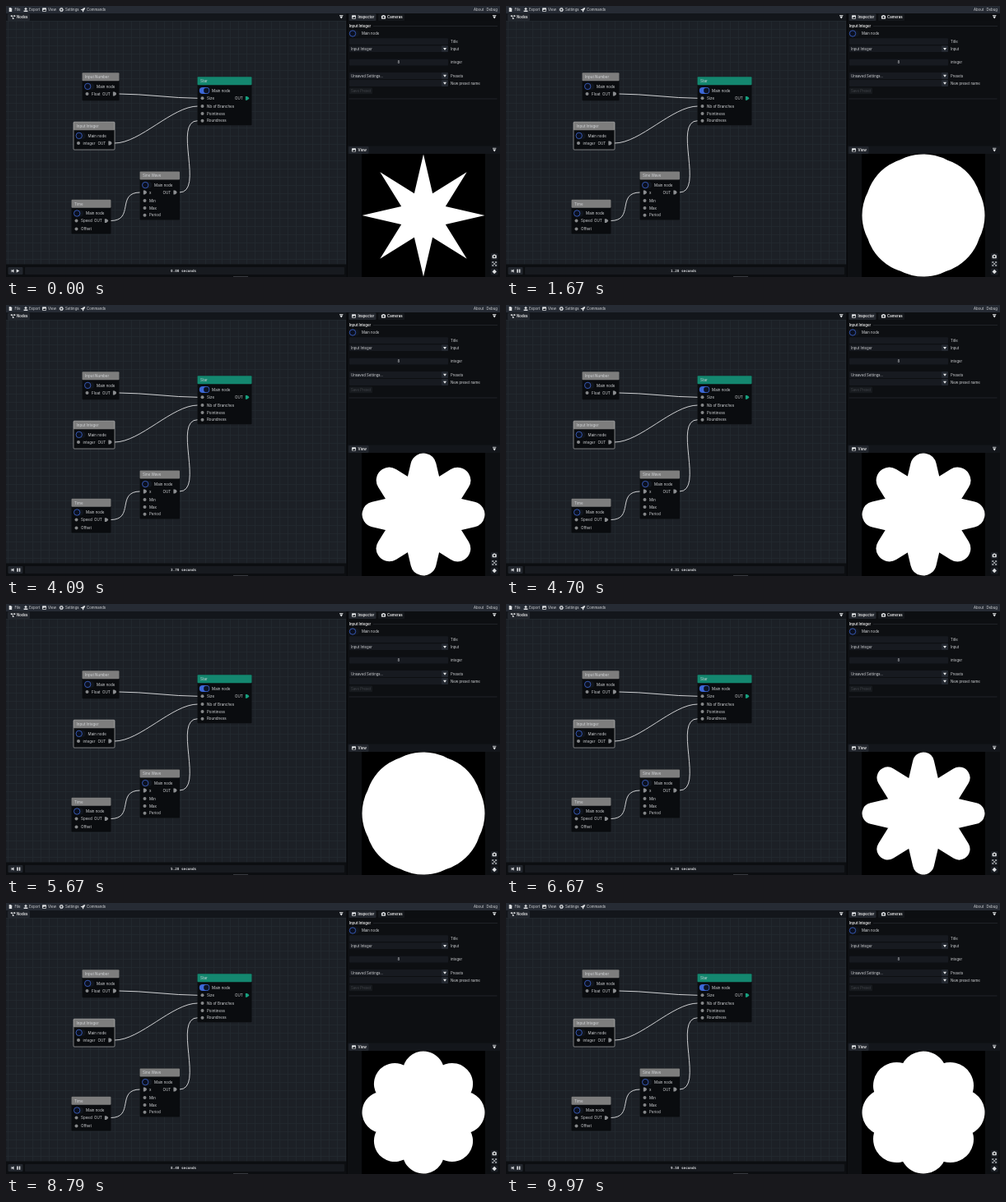
Write an HTML page that moves like this. It is 600x330 px and loops after 10000 ms.

```html
<!DOCTYPE html>
<html lang="en">
<head>
<meta charset="utf-8">
<title>Node editor</title>
<style>
  html, body { margin: 0; width: 100%; height: 100%; overflow: hidden; background: #0d0f12; }
  svg { display: block; width: 600px; height: 330px; }
  text { font: 4.3px Inter, sans-serif; fill: #d4d6d9; white-space: pre; }
  .node { font-size: 4.5px; }
  .bold { font-weight: 600; fill: #ececec; }
  .dim { fill: #43464b; }
  .mono { font: bold 4.3px "DejaVu Sans Mono", monospace; text-anchor: middle; }
</style>
</head>
<body>
<svg id="stage" viewBox="0 0 600 330" xmlns="http://www.w3.org/2000/svg">
  <defs>
    <pattern id="grid" width="10" height="10" x="2" y="18" patternUnits="userSpaceOnUse">
      <path d="M0 .5H10M.5 0V10" stroke="#242a31" stroke-width=".7"/>
    </pattern>
    <clipPath id="view"><rect x="432" y="180" width="150" height="150"/></clipPath>
  </defs>
</svg>
<script>
const LOOP = 10000, PLAY_AT = 395;
const CX = 507, CY = 255, RADIUS = 74.5, BRANCHES = 8, INNER = 0.39;
const LINK_STRENGTH = 31;
const stage = document.getElementById('stage');

function add(tag, attrs, content) {
  const el = document.createElementNS('http://www.w3.org/2000/svg', tag);
  for (const key in attrs) el.setAttribute(key, attrs[key]);
  if (content !== undefined) el.textContent = content;
  stage.appendChild(el);
  return el;
}
const rect = (x, y, width, height, fill, rx = 0) => add('rect', { x, y, width, height, fill, rx });
const label = (x, y, str, cls = '') => add('text', { x, y: y + 1.6, class: cls }, str);
const dot = (cx, cy, r, fill) => add('circle', { cx, cy, r, fill });
const path = (d, fill, stroke = 'none', width = 0.7) =>
  add('path', { d, fill, stroke, 'stroke-width': width });
const arrow = (x, y, fill = '#e4e6e8') => path(`M${x - 2} ${y - 1.3}h4l-2 3z`, fill);

function toggle(x, y, on) {
  if (on) {
    rect(x - 6, y - 4, 12.5, 8, '#3d68d8', 4);
    dot(x + 2.5, y, 3.2, '#0d1426');
    return;
  }
  rect(x - 4, y - 4, 12, 8, '#11151c', 4);
  add('circle', { cx: x, cy: y, r: 3.7, fill: '#0b1020', stroke: '#3a5fc0', 'stroke-width': 0.9 });
}

const outPin = (x, y, fill = '#8b8d90') =>
  path(`M${x - 2} ${y - 2.4}h1.8q2.4 1 2.4 2.4t-2.4 2.4h-1.8z`, fill);

function node({ x, y, w, h, title, rows, out, color = '#7d7d7d', pin, selected, on, bodyPin }) {
  rect(x, y, w, h, '#0a0c0f', 1);
  rect(x, y, w, 10, color, 1);
  if (selected) add('rect', { x, y, width: w, height: h, rx: 1, fill: 'none', stroke: '#c4c4c4', 'stroke-width': 0.6 });
  label(x + 3.6, y + 5.4, title, 'node');
  toggle(x + (on ? 8.3 : 6.7), y + 16.7, on);
  label(x + 17.6, y + 16.9, 'Main node', 'node');
  rows.forEach(([name, rowY], i) => {
    if (bodyPin && i === 0) outPin(x + 6.3, rowY);
    else dot(x + 6, rowY, 2, '#858789');
    label(x + 11.5, rowY, name, 'node');
  });
  label(out, rows[0][1], 'OUT', 'node');
  outPin(x + w - 5.6, rows[0][1], pin);
}

// Tangents keep a fixed strength and ease off on short links.
function link(x1, y1, x2, y2) {
  const half = Math.hypot(x2 - x1, y2 - y1) / 2;
  const c = LINK_STRENGTH * Math.sin(Math.PI / 2 * Math.min(1, half / LINK_STRENGTH));
  path(`M${x1} ${y1}C${x1 + c} ${y1} ${x2 - c} ${y2} ${x2} ${y2}`, 'none', '#d8dadc', 0.95);
}

function imageIcon(x, y) {
  rect(x - 2.5, y - 2.2, 5, 4.4, '#dcdee0', 0.7);
  path(`M${x - 1.9} ${y + 1.5}l1.3-1.8.8.8.8-1.2 1 2.2z`, '#15181d');
}
function cameraIcon(x, y) {
  rect(x - 2.6, y - 1.7, 5.2, 3.9, '#dcdee0', 0.7);
  rect(x - 1.2, y - 2.4, 2.4, 1.2, '#dcdee0', 0.3);
  dot(x, y + 0.2, 1.1, '#15181d');
}

// Menu bar
rect(0, 0, 600, 9, '#262b34');
path('M3.7 2h2.3l1.2 1.2v3.7h-3.5z', '#dcdee0');
path('M21.6 5.6h4.8v1.4h-4.8zM24 1.8l2 2.1h-1.3v1.4h-1.4V3.9H22z', '#dcdee0');
imageIcon(46.5, 4.5);
add('circle', { cx: 67.3, cy: 4.5, r: 1.6, fill: 'none', stroke: '#dcdee0', 'stroke-width': 1.2 });
add('circle', { cx: 67.3, cy: 4.5, r: 2.3, fill: 'none', stroke: '#dcdee0', 'stroke-width': 0.8, 'stroke-dasharray': '.9 .9' });
path('M96.2 2q-2.6 0-3.5 1.7l-1.5.3-.5 1 1.3.1 1 1 .1 1.3 1-.5.3-1.5q1.8-.9 1.8-3.4z', '#dcdee0');
[[10.5, 'File'], [28, 'Export'], [51, 'View'], [72, 'Settings'], [98, 'Commands'], [568, 'About'], [583.5, 'Debug']]
  .forEach(([x, s]) => label(x, 4.4, s));

// Node editor panel
rect(0, 9, 414, 9, '#13161b');
rect(2, 9.5, 27, 8.5, '#22262d', 1);
path('M7 12.2h3.5M7.2 12.4l1.6 2.8', 'none', '#dcdee0', 0.6);
[[5.8, 11.3], [9.6, 11.3], [7.8, 14.2]].forEach(([x, y]) => rect(x, y, 1.7, 1.7, '#dcdee0', 0.3));
label(13, 13.7, 'Nodes', 'bold');
rect(405, 11, 4.4, 0.8, '#e4e6e8');
arrow(407.2, 13.9);
rect(0, 18, 413.5, 297, '#1c2026');
rect(0, 18, 413.5, 297, 'url(#grid)');
rect(413.5, 9, 1.5, 321, '#07080a');

link(137, 107, 233, 112.3);
link(132, 167, 233, 122);
link(127, 261.5, 163, 227);
link(210.5, 227, 233, 139.7);

node({ x: 92.5, y: 81.2, w: 45, h: 34, title: 'Input Number', rows: [['Float', 107]], out: 117 });
node({ x: 82, y: 141.2, w: 50, h: 33.8, title: 'Input Integer', rows: [['integer', 167]], out: 111.5, selected: true });
node({ x: 79.5, y: 235.8, w: 48, h: 41.7, title: 'Time', rows: [['Speed', 261.6], ['Offset', 271.4]], out: 107 });
node({
  x: 162.5, y: 201.4, w: 48.5, h: 59, title: 'Sine Wave', out: 190.5, bodyPin: true,
  rows: [['x', 227], ['Min', 237], ['Max', 246], ['Period', 254.7]]
});
node({
  x: 232.5, y: 86.3, w: 66, h: 59, title: 'Star', out: 278, color: '#14876f', pin: '#17a07f', on: true,
  rows: [['Size', 112.3], ['Nb of Branches', 122], ['Pointiness', 131], ['Roundness', 139.7]]
});

// Timeline
rect(0, 314.5, 413.5, 15.5, '#0c0e11');
rect(2.5, 318, 18, 9, '#22262d', 1);
rect(23, 318, 388, 9, '#171a1f', 1);
rect(276, 329, 18, 0.7, '#4a4d52');
path('M6.6 320.9v3.4M9.2 320.9v3.4l-2.3-1.7z', '#e4e6e8', '#e4e6e8', 0.5);
const play = path('M12.7 320.4v4.4l3.6-2.2z', '#e4e6e8');
const pause = path('M13.2 320.5h1.5v4.2h-1.5zM15.8 320.5h1.5v4.2h-1.5z', '#e4e6e8');
const clock = add('text', { x: 215.6, y: 324.3, class: 'mono' }, '0.00 seconds');

// Inspector
rect(415, 9, 185, 9, '#0c0e11');
rect(416.5, 9.5, 33, 8.5, '#22262d', 1);
rect(452, 9.5, 32, 8.5, '#14171b', 1);
rect(591, 11, 4.4, 0.8, '#e4e6e8');
arrow(593.2, 13.9);
imageIcon(422.5, 13.5);
label(427.5, 13.6, 'Inspector', 'bold');
cameraIcon(458.5, 13.5);
label(463, 13.6, 'Cameras', 'bold');
rect(415, 18, 185, 152.5, '#0d0f12');
label(416.8, 24.2, 'Input Integer', 'bold');
rect(446, 24, 151, 0.6, '#2c3036');
toggle(421, 33.5, false);
label(432, 33.5, 'Main node');
[[43.2, 'Title'], [52.2, 'Input'], [68.7, 'integer'], [85, 'Presets'], [94, 'New preset name']].forEach(([y, s]) => {
  rect(417, y - 3.9, 120, 7.8, '#171a20', 1);
  label(540, y, s);
});
[52.2, 85, 94].forEach(y => {
  rect(529, y - 3.9, 8, 7.8, '#242931', 1);
  arrow(533, y);
});
label(419, 52.2, 'Input Integer');
label(475.5, 68.7, '8');
label(419, 85, 'Unsaved Settings...');
rect(417, 99.5, 28, 7.8, '#171a1e', 1);
label(419, 103.4, 'Save Preset', 'dim');
rect(416.5, 112.7, 180, 0.6, '#2c3036');

// View
rect(415, 170.5, 185, 9.5, '#13161b');
rect(416.5, 171, 24, 9, '#22262d', 1);
rect(591, 172.8, 4.4, 0.8, '#e4e6e8');
arrow(593.2, 175.7);
imageIcon(422.5, 175.4);
label(427.5, 175.4, 'View', 'bold');
rect(415, 180, 185, 150, '#0d0f12');
rect(432, 180, 150, 150, '#000');
const star = add('path', {
  fill: '#fff', stroke: '#fff', 'stroke-linejoin': 'round', 'clip-path': 'url(#view)'
});
[305, 314, 323.5].forEach(y => rect(589, y - 4, 8.5, 8, '#1a1e24', 1));
cameraIcon(593.2, 305);
path('M590.8 313v-1.4h1.4M594.2 311.6h1.4v1.4M595.6 315v1.4h-1.4M592.2 316.4h-1.4V315M591.2 312l4 4M595.2 312l-4 4',
  'none', '#dcdee0', 0.7);
path('M593.2 320.8l2.7 2.7-2.7 2.7-2.7-2.7z', '#dcdee0');

// The core shrinks while the round stroke grows, so the tips stay in place.
function drawStar(roundness) {
  const size = RADIUS * (1 - roundness);
  const points = Array.from({ length: BRANCHES * 2 }, (_, i) => {
    const a = i * Math.PI / BRANCHES;
    const r = i % 2 ? size * INNER : size;
    return `${(CX + r * Math.sin(a)).toFixed(2)} ${(CY - r * Math.cos(a)).toFixed(2)}`;
  });
  star.setAttribute('d', `M${points.join('L')}Z`);
  star.setAttribute('stroke-width', 2 * RADIUS * roundness);
}

const start = performance.now();
function frame() {
  const t = (performance.now() - start) % LOOP;
  const seconds = Math.max(0, t - PLAY_AT) / 1000;
  const playing = t >= PLAY_AT;
  play.setAttribute('visibility', playing ? 'hidden' : 'visible');
  pause.setAttribute('visibility', playing ? 'visible' : 'hidden');
  clock.textContent = `${seconds.toFixed(2)} seconds`;
  drawStar((1 - Math.cos(Math.PI * seconds)) / 2);
  requestAnimationFrame(frame);
}
frame();
</script>
</body>
</html>
```
